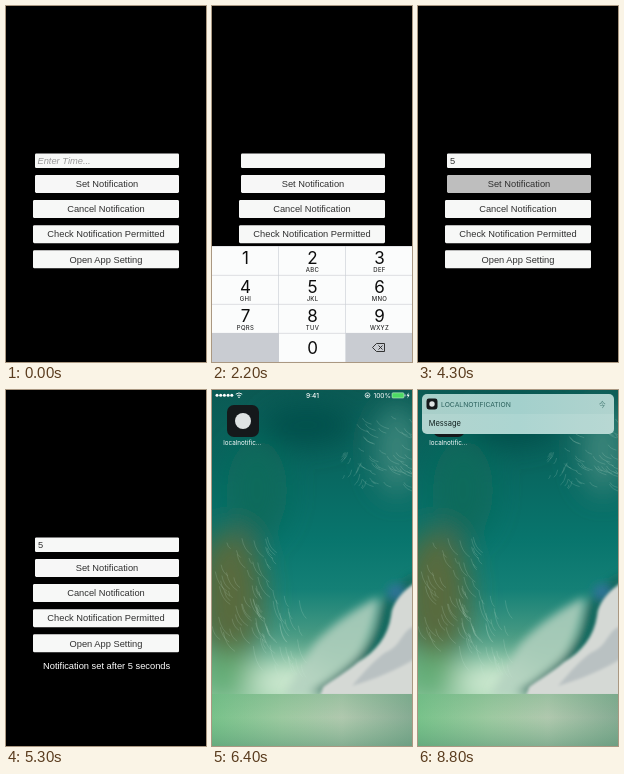
Animation of 200 by 356 pixels, one loop 8.9 s. Source, as an HTML page:

```html
<!DOCTYPE html>
<html lang="en">
<head>
<meta charset="utf-8">
<title>Local notification demo</title>
<style>
html, body { margin: 0; width: 100%; height: 100%; overflow: hidden; background: #000; }
svg { display: block; width: 100vw; height: 100vh; }
text { white-space: pre; }
.app { font: 9.3px "Liberation Sans", Arial, sans-serif; fill: #303030; }
.ios { font-family: Inter, Roboto, sans-serif; }
.mid { text-anchor: middle; }
</style>
</head>
<body>
<svg viewBox="0 0 200 356" preserveAspectRatio="none">
  <defs>
    <linearGradient id="sea" x1="0" y1="0" x2="0" y2="1">
      <stop offset="0" stop-color="#0b5a54"/>
      <stop offset=".2" stop-color="#08655e"/>
      <stop offset=".42" stop-color="#08756d"/>
      <stop offset=".56" stop-color="#148076"/>
      <stop offset=".7" stop-color="#4c9c84"/>
      <stop offset=".86" stop-color="#8fc8a0"/>
    </linearGradient>
    <linearGradient id="shore" x1="0" x2="1">
      <stop offset="0" stop-color="#78c28a"/>
      <stop offset=".35" stop-color="#9cc9a0"/>
      <stop offset=".65" stop-color="#b0c8ae"/>
      <stop offset="1" stop-color="#86ab93"/>
    </linearGradient>
    <linearGradient id="depth" x1="0" y1="0" x2="0" y2="1">
      <stop offset="0" stop-color="#5aa878" stop-opacity=".25"/>
      <stop offset=".45" stop-color="#5aa878" stop-opacity="0"/>
      <stop offset="1" stop-color="#4f8f70" stop-opacity=".45"/>
    </linearGradient>
    <linearGradient id="glass" x1="0" x2="1">
      <stop offset="0" stop-color="#a9cfc9"/>
      <stop offset=".5" stop-color="#a3d0cc"/>
      <stop offset="1" stop-color="#b0d3ce"/>
    </linearGradient>
    <filter id="soft" filterUnits="userSpaceOnUse" x="-80" y="-80" width="360" height="520"><feGaussianBlur stdDeviation="14"/></filter>
    <filter id="mist" filterUnits="userSpaceOnUse" x="-40" y="-40" width="280" height="440"><feGaussianBlur stdDeviation="4"/></filter>
    <filter id="edge" filterUnits="userSpaceOnUse" x="-40" y="-40" width="280" height="440"><feGaussianBlur stdDeviation="1.6"/></filter>
    <clipPath id="sky"><rect width="200" height="304"/></clipPath>
    <clipPath id="card"><rect x="4" y="4" width="192" height="40" rx="5"/></clipPath>
  </defs>

  <g id="wall">
    <rect width="200" height="356" fill="url(#sea)"/>
    <g clip-path="url(#sky)">
      <g filter="url(#soft)">
        <ellipse cx="95" cy="35" rx="45" ry="20" fill="#04504b"/>
        <ellipse cx="185" cy="60" rx="22" ry="45" fill="#3a857a"/>
        <ellipse cx="45" cy="100" rx="30" ry="50" fill="#106a5c"/>
        <ellipse cx="18" cy="205" rx="34" ry="65" fill="#586b3c"/>
        <ellipse cx="14" cy="285" rx="28" ry="22" fill="#64ad74"/>
        <ellipse cx="76" cy="292" rx="40" ry="22" fill="#d0ead2"/>
      </g>
      <g filter="url(#mist)">
        <path d="M167 207C148 216 122 232 102 254L72 306H104C130 290 160 262 167 207Z" fill="#b4d2c0" opacity=".85"/>
        <path d="M204 182C184 194 168 212 166 232C160 258 136 280 98 303H120L204 230Z" fill="#12695f"/>
        <ellipse cx="184" cy="202" rx="9" ry="8" fill="#2f7396"/>
      </g>
      <g filter="url(#edge)">
        <path d="M204 192C192 200 180 212 179 226C176 246 164 262 146 272C134 282 120 290 111 297L108 306H204Z" fill="#d5d9d5"/>
        <path d="M204 236C190 238 190 256 174 262C164 268 150 284 140 296C160 290 186 280 204 268Z" fill="#b9c1c2"/>
      </g>
      <path id="foam" fill="none" stroke="#c9e4d4" stroke-width=".5" opacity=".35"/>
    </g>
    <rect y="304" width="200" height="52" fill="url(#shore)"/>
    <rect y="304" width="200" height="52" fill="url(#depth)"/>
  </g>

  <g id="home" class="ios" fill="#fff">
    <g>
      <rect x="15" y="15" width="32" height="32" rx="7" fill="#15191b"/>
      <circle cx="31" cy="31" r="8" fill="#dfe3e3"/>
    </g>
    <text class="mid" x="30.3" y="55" font-size="6.3">localnotific…</text>
  </g>

  <g id="status" class="ios" fill="#fff" font-size="6.6">
    <g id="dots"></g>
    <path d="M23.8 4.2Q27 1.6 30.2 4.2M25.2 5.8Q27 4.3 28.8 5.8" fill="none" stroke="#fff" stroke-width=".9"/>
    <circle cx="27" cy="7.2" r=".8"/>
    <text class="mid" x="100.5" y="7.8" font-weight="500">9:41</text>
    <circle cx="155.5" cy="5.3" r="2.4" fill="none" stroke="#fff" stroke-width=".7"/>
    <rect x="154.5" y="4.8" width="2" height="1.6"/>
    <text x="161.5" y="7.8">100%</text>
    <rect x="180" y="2.8" width="12" height="5.2" rx="1" fill="#4cd964" stroke="#d6f5dc" stroke-width=".5"/>
    <rect x="192.6" y="4.4" width=".8" height="2"/>
    <path d="M196.6 2.4L194.6 5.8H196L195.4 8.4L197.6 4.8H196.2Z"/>
  </g>

  <g id="banner" class="ios">
    <g clip-path="url(#card)">
      <rect x="4" y="4" width="192" height="40" fill="url(#glass)"/>
      <rect x="4" y="24" width="192" height="20" fill="#fff" opacity=".1"/>
    </g>
    <rect x="8.5" y="8.5" width="11" height="11" rx="2.4" fill="#15191b"/>
    <circle cx="14" cy="14" r="2.7" fill="#dfe3e3"/>
    <text x="23" y="16.6" font-size="6.8" fill="#2c625e">LOCALNOTIFICATION</text>
    <text x="181" y="16.6" font-size="6.6" fill="#4d817b" style="font-family:'Noto Sans CJK SC','Noto Sans CJK JP',sans-serif">今</text>
    <text x="10.7" y="36" font-size="7.5" fill="#10201e">Message</text>
  </g>

  <g id="app" class="app">
    <rect width="200" height="356" fill="#000"/>
    <rect x="29" y="147.5" width="144" height="14.5" rx="1.2" fill="#f7f8f7"/>
    <text id="hint" x="31.5" y="157.8" font-style="italic" fill="#979797">Enter Time...</text>
    <text id="value" x="32" y="157.8">5</text>
    <g id="buttons"></g>
    <text id="note" class="mid" x="100.6" y="279.3" fill="#fff">Notification set after 5 seconds</text>
  </g>

  <g id="keys" class="ios mid" fill="#0c0c0c"></g>
</svg>
<script>
const LOOP = 8900, STEP = 100;
const $ = id => document.getElementById(id);
const show = (id, on) => $(id).setAttribute("visibility", on ? "visible" : "hidden");
const fade = (id, v) => $(id).setAttribute("opacity", v);
const ease = p => p * p * (3 - 2 * p);
const out = p => 1 - (1 - p) ** 3;

// value of a track [[time, value], ...] at t
function track(t, rows, curve = p => p) {
  if (t <= rows[0][0]) return rows[0][1];
  for (let i = 1; i < rows.length; i++) {
    const [a, v] = rows[i - 1], [b, w] = rows[i];
    if (t < b) return v + (w - v) * curve((t - a) / (b - a));
  }
  return rows[rows.length - 1][1];
}

function buildButtons() {
  const labels = ["Set Notification", "Cancel Notification", "Check Notification Permitted", "Open App Setting"];
  $("buttons").innerHTML = labels.map((label, i) => {
    const x = i ? 27 : 29, y = 169 + 25.1 * i;
    return `<rect x="${x}" y="${y}" width="${173 - x}" height="18" rx="1.4" fill="#f7f8f7"/>
      <text class="mid" x="${(x + 173) / 2}" y="${y + 12.2}">${label}</text>`;
  }).join("");
}

function buildKeys() {
  const letters = ["", "ABC", "DEF", "GHI", "JKL", "MNO", "PQRS", "TUV", "WXYZ"];
  let s = '<rect y="240" width="200" height="116" fill="#c9ccd2"/>';
  const key = (col, row, digit, sub) => {
    const x = col * 67, y = 240.5 + row * 29, cx = 33.5 + col * 67;
    s += `<rect x="${x}" y="${y}" width="66.4" height="28.4" fill="#fbfcfc"/>
      <text x="${cx}" y="${y + (row < 3 ? 17.8 : 20)}" font-size="17">${digit}</text>
      <text x="${cx}" y="${y + 25.4}" font-size="6" letter-spacing=".3">${sub}</text>`;
  };
  letters.forEach((sub, i) => key(i % 3, Math.floor(i / 3), i + 1, sub));
  key(1, 3, 0, "");
  s += `<path d="M160.5 341.5L164.5 337.5H172.5V345.5H164.5Z M166.5 339.5l4 4m0-4l-4 4"
    fill="none" stroke="#222" stroke-width=".9"/>`;
  $("keys").innerHTML = s;
}

function buildFoam() {
  let seed = 7, d = "";
  const rnd = () => (seed = seed * 16807 % 2147483647) / 2147483647;
  const streaks = (n, x, y, w, h, dx, dy) => {
    for (let i = 0; i < n; i++) {
      const k = .4 + rnd(), px = x + rnd() * w, py = y + rnd() * h;
      d += `M${px} ${py}q${dx * k * .2} ${dy * k * .7} ${dx * k} ${dy * k}`;
    }
  };
  streaks(50, 0, 145, 60, 100, 9, 15);
  streaks(35, 40, 195, 50, 80, 7, 18);
  streaks(45, 145, 25, 55, 70, 9, 6);
  streaks(14, 130, 60, 25, 40, -4, 8);
  $("foam").setAttribute("d", d);
}

function drawApp(t) {
  show("hint", t < 1400);
  show("value", t >= 2600);
  show("note", t >= 4700);
  show("app", t < 6400);
  const grey = Math.round(track(t, [[4100, 247], [4200, 190], [4500, 190], [4600, 247]]));
  $("buttons").firstElementChild.setAttribute("fill", `rgb(${grey},${grey},${grey})`);

  const at = (a, b, c) => track(t, [[5800, a], [6000, b], [6400, c]], p => t < 6000 ? p * p : p);
  $("app").setAttribute("transform",
    `translate(${at(0, 2, 15)} ${at(0, 2, 15)}) scale(${at(1, .88, .16)} ${at(1, .826, .09)})`);
  fade("app", track(t, [[6150, 1], [6380, 0]]));

  const drop = track(t, [[1400, 116], [1800, 0]], out) + track(t, [[3300, 0], [3600, 116]], ease);
  $("keys").setAttribute("transform", `translate(0 ${drop})`);
  show("keys", drop < 116);
}

function drawHome(t) {
  const away = track(t, [[5800, 1], [6000, .8], [6400, 0]]);
  const zoom = 1 + .35 * away;
  $("wall").setAttribute("transform", `translate(100 178) scale(${zoom}) translate(-100 -178)`);
  $("wall").style.filter = away ? `blur(${12 * away}px) brightness(${1 - .25 * away})` : "none";
  fade("home", track(t, [[6150, 0], [6400, 1]]));
  fade("status", Math.min(track(t, [[6150, 0], [6400, 1]]), track(t, [[7900, 1], [8300, 0]])));
  const slide = t < 8000 ? -48 : track(t, [[8000, -41], [8500, 0]], out);
  $("banner").setAttribute("transform", `translate(0 ${slide})`);
  show("banner", t >= 8000);
}

$("dots").innerHTML = [0, 1, 2, 3, 4].map(i => `<circle cx="${5 + i * 3.7}" cy="5.3" r="1.5"/>`).join("");
buildButtons();
buildKeys();
buildFoam();

const start = performance.now();
function tick() {
  const t = Math.floor((performance.now() - start) % LOOP / STEP) * STEP;
  drawApp(t);
  drawHome(t);
  requestAnimationFrame(tick);
}
tick();
</script>
</body>
</html>
```
